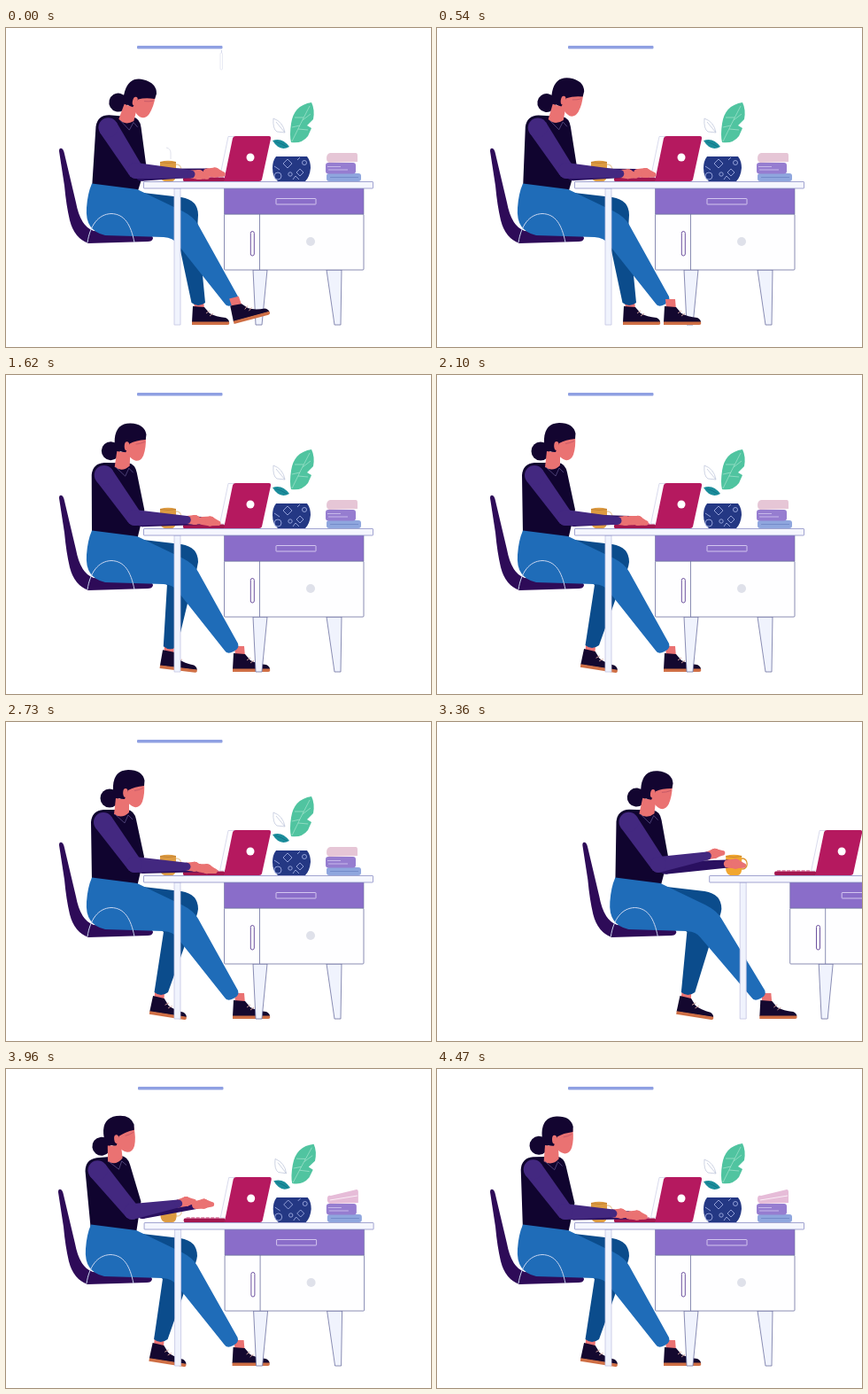
These frames come from a looping animation (480 by 360 pixels, 4.5 s). An HTML page with a canvas:

```html
<!DOCTYPE html>
<html lang="en">
<head>
<meta charset="utf-8">
<title>Working at a desk</title>
<style>
  html, body { margin: 0; width: 100%; height: 100%; overflow: hidden; background: #fff; }
  canvas { display: block; }
</style>
</head>
<body>
<canvas id="stage" width="480" height="360"></canvas>
<script>
const ctx = document.getElementById('stage').getContext('2d');
const LOOP = 4500, GONE = 2880, ENTER = 3180;

const C = {
  skin: '#ea7272', hair: '#130530', top: '#10042f', sleeve: '#432880', farSleeve: '#2a1060',
  near: '#1f6cb8', far: '#0b4c8c', chair: '#2e0b58', sole: '#cf6f45', shoe: '#14082f',
  pale: '#f0f3fd', edge: '#8b8fc4', line: '#6c70a0', drawer: '#8a6dc9', laptop: '#b5195f'
};

// time, lean, nod, near wrist x, y, hand angle, far wrist x, y, hand angle
const POSE = [
  [0, 4.5, 9.5, 209, 165, 3, 227, 163, 0],
  [1110, 1.8, 4, 205, 165, 0, 226, 163, 0],
  [2100, 0, 0, 204, 164, 0, 218, 164, 5],
  [2880, 0, 0, 204, 164, 0, 218, 164, 5],
  [3180, 1.8, 4, 201, 151, -18, 224, 160, 0],
  [3360, 1.8, 4, 201, 151, -18, 224, 160, 0],
  [3600, -12, -6, 191, 119, -56, 215, 122, -35],
  [3750, -11, -6, 191, 121, -54, 215, 124, -33],
  [4080, -2, -1, 198, 164, 0, 216, 165, 0],
  [4500, -1, -1, 199, 164, 0, 217, 164, 0]
];

// time, woman offset, desk offset
const SLIDE = [
  [3180, 421, 440], [3270, 215, 270], [3360, 105, 153], [3480, 50, 83], [3600, 19.5, 39],
  [3690, 5, 21], [3780, -2, 9], [3870, -3, 3], [4020, 0, 0], [4500, 0, 0]
];

// time, plant sway, top book tilt
const SWAY = [[3180, 11, 1], [3600, 10, 1], [3780, -3, 1], [3930, 2, 1], [4080, 0, 1], [4500, 0, 1]];

const lerp = (a, b, k) => a + (b - a) * k;
const smooth = (a, b, t) => {
  const k = Math.min(1, Math.max(0, (t - a) / (b - a)));
  return k * k * (3 - 2 * k);
};

// Monotone cubic interpolation through table rows.
function track(rows, t) {
  let i = 0;
  while (i < rows.length - 2 && t >= rows[i + 1][0]) i++;
  const h = rows[i + 1][0] - rows[i][0], k = Math.min(1, Math.max(0, (t - rows[i][0]) / h));
  return rows[i].slice(1).map((a, n) => {
    const c = n + 1, b = rows[i + 1][c];
    const slope = j => rows[j] && rows[j + 1]
      ? (rows[j + 1][c] - rows[j][c]) / (rows[j + 1][0] - rows[j][0]) : null;
    const mid = slope(i);
    const tangent = s => s === null ? mid : s * mid <= 0 ? 0 : 2 * s * mid / (s + mid);
    const m0 = tangent(slope(i - 1)) * h, m1 = tangent(slope(i + 1)) * h;
    const k2 = k * k, k3 = k2 * k;
    return (2 * k3 - 3 * k2 + 1) * a + (k3 - 2 * k2 + k) * m0 + (3 * k2 - 2 * k3) * b + (k3 - k2) * m1;
  });
}

function shape(d, fill, stroke, width = 0.8) {
  const p = new Path2D(d);
  if (fill) { ctx.fillStyle = fill; ctx.fill(p); }
  if (stroke) { ctx.strokeStyle = stroke; ctx.lineWidth = width; ctx.stroke(p); }
}
function box(x, y, w, h, r, fill, stroke, width = 0.8) {
  ctx.beginPath();
  ctx.roundRect(x, y, w, h, r);
  if (fill) { ctx.fillStyle = fill; ctx.fill(); }
  if (stroke) { ctx.strokeStyle = stroke; ctx.lineWidth = width; ctx.stroke(); }
}
function oval(x, y, rx, ry, fill, stroke, width = 0.8) {
  ctx.beginPath();
  ctx.ellipse(x, y, rx, ry, 0, 0, 7);
  if (fill) { ctx.fillStyle = fill; ctx.fill(); }
  if (stroke) { ctx.strokeStyle = stroke; ctx.lineWidth = width; ctx.stroke(); }
}
function at(x, y, deg, draw) {
  ctx.save();
  ctx.translate(x, y);
  ctx.rotate(deg * Math.PI / 180);
  draw();
  ctx.restore();
}
const around = (x, y, deg, draw) => at(x, y, deg, () => { ctx.translate(-x, -y); draw(); });
const shifted = (x, draw) => at(x, 0, 0, draw);

function taper([x1, y1], [x2, y2], r1, r2, fill) {
  const a = Math.atan2(y2 - y1, x2 - x1), s = Math.sin(a), c = Math.cos(a);
  ctx.fillStyle = fill;
  ctx.beginPath();
  ctx.moveTo(x1 - s * r1, y1 + c * r1);
  ctx.lineTo(x2 - s * r2, y2 + c * r2);
  ctx.lineTo(x2 + s * r2, y2 - c * r2);
  ctx.lineTo(x1 + s * r1, y1 - c * r1);
  ctx.fill();
  oval(x1, y1, r1, r1, fill);
  oval(x2, y2, r2, r2, fill);
}

function shoe(x, y, deg) {
  at(x, y, deg, () => {
    shape('M-5,-8 L6,-8 L7,4 L-4,4 Z', C.skin);
    shape('M-6,0 L7,1 L13,8 Q20,12 31,13 Q35,15 35,18 L-7,18 Z', C.shoe);
    shape('M-7,17.5 L35,17.5 Q36,21 33,21 L-7,21 Z', C.sole);
    shape('M9,8 L13,5 M13,11 L17,8', null, '#d8a9a0', 0.9);
  });
}

function farLeg(k, step) {
  const ax = lerp(217, 175, k) + step, ay = lerp(314, 309, k);
  shoe(ax - 3 * k, ay + k, 9 * k);
  shape(`M138,184 L198,191 Q217,194 217,211 Q216,220 ${lerp(217, 211, k)},227 L${ax + 8},${ay - 4}
    Q${ax},${ay + 2} ${ax - 7.5},${ay - 4} L${lerp(194, 178, k)},237 L150,215 Z`, C.far);
}

function chair() {
  shape(`M60,139 Q60,135 63,136 Q65,137 66,142 L79,197 Q84,224 99,229 L161,233 Q166,234 166,237.5
    Q165,241 160,241 L93,243 Q77,237 72,217 Q68,200 66,178 Z`, C.chair);
}

function nearLeg(step) {
  shape(`M97,175.5 L148,182 L199,206.5 Q212,213 217,222 L${262 + step},303 Q${264 + step},309 ${257 + step},312
    Q${250 + step},316 ${247 + step},311 L193,243 Q189,237 178,236 L112,234 Q89,229 91,203 Q92,187 97,175.5 Z`, C.near);
  shape('M92,242 C95,223 104,210 119,209.5 C134,210 141,222 145,242', null, '#c9d6f0', 1);
}

function head() {
  oval(117, 86, 10.5, 10.5, C.hair);
  shape('M124,86 L139,88 L139,102 Q131,110 122,104 Z', C.skin);
  shape('M132,70 L156,69 Q157,81 154,90 Q151,97 145,96 Q139,94 136,88 L130,90 Z', C.skin);
  shape('M121,72 Q122,54.5 138,54 Q154,54 156.5,66 L156,72 Q145,73 138,77 L134,87 Q125,87 121,81 Z', C.hair);
  oval(135, 80, 2.8, 5, C.skin);
  shape('M145,77.5 Q150,77 155,74.5', null, '#b34e63', 0.6);
}

function torso(lean, nod) {
  around(122, 182, lean, () => {
    shape(`M97,180 L96,113 Q97,100 110,99 L137,99 Q145,100 147,110 L156,152 L148,186 Q120,184 97,180 Z`, C.top);
    around(130, 98, nod, head);
    shape('M123,104 L134,114 L138,105 L143,110', null, '#5a4f86', 0.8);
  });
}

function hand(wrist, deg) {
  const a = deg * Math.PI / 180, dx = Math.cos(a), dy = Math.sin(a);
  const palm = [wrist[0] + dx * 9, wrist[1] + dy * 9];
  taper(wrist, palm, 4.5, 5.5, C.skin);
  taper(palm, [wrist[0] + dx * 17 + 1, wrist[1] + dy * 17 + 2], 5.5, 2.8, C.skin);
}

function arms(p, t) {
  const [lean, , nx, ny, na, fx, fy, fa] = p;
  const typing = t < GONE || t > 4080;
  const tap = typing ? Math.sin(t / 45) : 0;
  const a = lean * Math.PI / 180;
  const shoulder = [122 - 12 * Math.cos(a) + 69 * Math.sin(a), 182 - 12 * Math.sin(a) - 69 * Math.cos(a)];
  const elbow = [145 + lean * 0.35, 161];
  const farElbow = [154 - lean * 0.2, 164 + lean * 0.4];
  const wrist = [nx, ny + tap], farWrist = [fx, fy - tap];
  if (t > 3480 && t < 3870) {
    at(nx - 5, ny, 0, () => shape('M10,-2 L18,-21 L41,-19 L38,-3 L16,7 Z', '#fff', '#e3e4ee'));
  }
  taper(farElbow, farWrist, 7, 4.5, C.farSleeve);
  hand(farWrist, fa);
  hand(wrist, na);
  taper(shoulder, elbow, 11, 9, C.sleeve);
  taper(elbow, wrist, 9, 4.5, C.sleeve);
}

function desk() {
  box(190, 181, 7, 154, 0, C.pale, '#c3c5e2');
  shape('M279,273 L295,273 L289,335 L282,335 Z', C.pale, C.line);
  shape('M362,273 L379,273 L378,335 L371,335 Z', C.pale, C.line);
  box(246.5, 210, 157.5, 63, 1, '#fefeff', C.line);
  box(246.5, 181, 157.5, 29, 0, C.drawer, C.line, 0.6);
  box(305, 192.5, 45, 6.5, 0.5, null, '#d3c5ef', 1);
  shape('M286.5,210 V273', null, C.line);
  box(276.3, 229.5, 4, 27.5, 2, '#fff', '#6b4f9e', 1);
  oval(344, 241, 5, 5, '#dfe1ea');
  box(155.5, 173.5, 259, 7.5, 0.5, '#f5f6fe', C.edge);
}

function mug(fresh) {
  const fill = fresh ? '#f1a62f' : '#dd9b42';
  oval(193, 160, 5, 6, null, fresh ? '#dd9630' : '#ecd3ad', 1.3);
  shape('M174,151 Q183,148.5 192,151 L192,167 Q191,173 187,173 L179,173 Q175,172 174,167 Z', fill);
  shape('M174,151.5 Q183,153.5 192,151.5', null, '#b9792c', 0.7);
}

function laptop() {
  shape('M251,122.5 L258,122.5 L248,168 L241.5,168 Z', '#fdfdff', '#d0d2e8');
  shape('M259,122 L297,122 Q299.5,122 299,125 L289,171 Q288.5,173 286,173 L246,173 L256,124.5 Q256.5,122 259,122 Z', C.laptop);
  oval(276, 146, 4.5, 4.5, '#fff');
  box(200, 168.5, 47, 4.5, 1.5, '#a3164f');
  ctx.setLineDash([4, 1.5]);
  shape('M203,168 H240', null, '#c2336c', 1.2);
  ctx.setLineDash([]);
}

function plant(sway) {
  around(322, 145, sway, () => {
    shape('M302,102 Q301,114 306,117 L315,118 Q313,106 302,102 Z M305,106 L315,118', '#fff', '#c0c8dc');
    shape('M301,127 Q312,123 320,134 Q309,140 301,127 Z', '#1b8d9b');
    shape('M304,128 Q311,130 317,134', null, '#0f6c80', 0.7);
    shape('M345,84 Q325,87 322,108 Q320,121 322,129 Q334,131 341,122 L345,113 L340,110 L347,103 Q349,92 345,84 Z', '#50c4a0');
    shape('M343,88 Q333,107 323,128 M336,101 L326,101 M332,110 L323,112 M335,104 L344,97 M330,114 L341,115', null, '#a7e4cf', 0.7);
  });
  shape('M305,145 L340,145 Q344,150 344,158 Q343,168 338,173 L307,173 Q301,168 301,158 Q301,150 305,145 Z', '#243884');
  shape('M313,153 L318,148 L323,153 L318,158 Z M328,163 L332,159 L336,163 L332,167 Z M324,171 L327,167 L331,171', null, '#9dabe0', 0.9);
  oval(307, 167, 4, 4, null, '#9dabe0', 0.9);
  oval(337, 152, 2.5, 2.5, null, '#9dabe0', 0.9);
  oval(321, 165, 2.2, 2.2, null, '#9dabe0', 0.9);
  shape('M303,156 L309,160 M329,149 L332,146', null, '#9dabe0', 0.9);
}

function books(tilt) {
  box(362, 164, 39, 9, 3, '#8fa6de');
  shape('M366,168.5 H398', null, '#6f86c6', 0.8);
  box(361, 152, 34, 12.5, 3, '#967dd0');
  shape('M363,156.5 H378 M364,160 H386', null, '#d5c8f2', 0.8);
  const y = 141 - 5 * tilt, left = 141 + 2 * tilt;
  shape(`M366,${left} L395,${y} Q397,${y} 397,${y + 3} L397,151 L365,152 Q362,151 362,147 Q362,142 366,${left} Z`,
    tilt ? '#e6bcd8' : '#e6c6d6');
  if (tilt) shape('M365,148 L396,143', null, '#faeef6', 1);
}

function shelf(cord) {
  box(148, 20, 96.5, 3.6, 1, '#8fa0e2');
  if (cord) {
    shape('M243.5,25 V47', null, '#d4d7ea', 1);
    box(242, 28, 2.5, 19, 1, '#fff', '#dfe1f0', 0.7);
  }
}

function render(t) {
  ctx.clearRect(0, 0, 480, 360);
  if (t >= GONE && t < ENTER) return;
  const arriving = t >= ENTER;
  const [body, table] = arriving ? track(SLIDE, t) : [0, 0];
  const [sway, tilt] = arriving ? track(SWAY, t) : [0, 0];
  const pose = track(POSE, t);
  const back = arriving ? 1 : smooth(1350, 1750, t);
  const step = arriving ? 4 * (1 - smooth(3600, 4080, t)) : 0;
  const lift = arriving ? 0 : 1 - smooth(0, 500, t);
  const nearShoe = () => shoe(263 - 4 * lift + step, 314 - 2 * lift, -15 * lift);

  if (!arriving || t > 3450) {
    shifted(table * 1.69, () => shelf(t < 90 || (arriving && t < 3840)));
  }
  shifted(body, () => {
    farLeg(back, step);
    chair();
    if (back > 0.5) nearShoe();
    torso(pose[0], pose[1]);
    nearLeg(step);
  });
  shifted(table, () => {
    desk();
    mug(arriving && t < 3950);
    if (t < 90) shape('M181,135 Q186,136 186,141 V148', null, '#d9dbe8');
  });
  shifted(table * 1.19, () => { laptop(); plant(sway); });
  shifted(table * 1.43, () => books(tilt));
  shifted(body, () => {
    if (back <= 0.5) nearShoe();
    arms(pose, t);
  });
}

function tick() {
  render(performance.now() % LOOP);
  requestAnimationFrame(tick);
}
tick();
</script>
</body>
</html>
```
